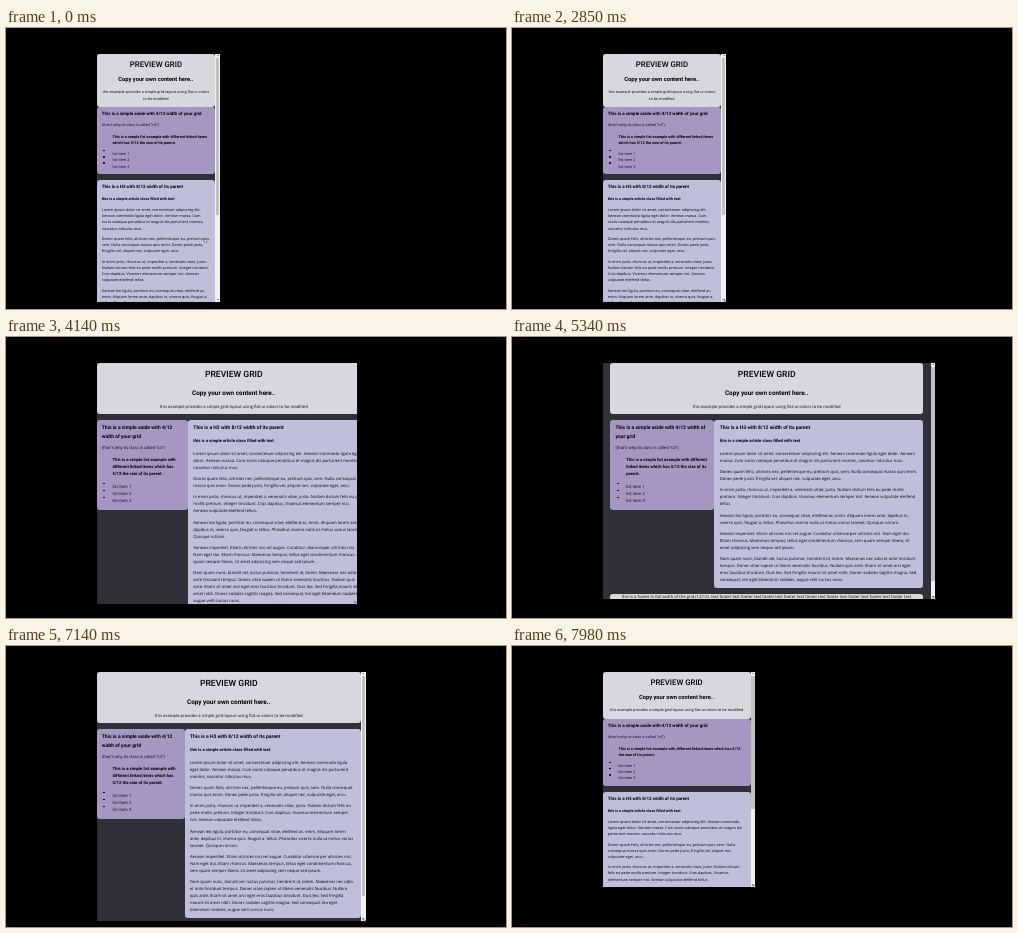
An HTML page that plays this animation: 500 px wide and 281 px high, repeating every 8000 ms.

```html
<!DOCTYPE html>
<html lang="en">
<head>
<meta charset="utf-8">
<title>Preview grid</title>
<style>
* { box-sizing: border-box; margin: 0; padding: 0; }
html, body { width: 100%; height: 100%; overflow: hidden; background: #000; }
#stage { position: relative; width: 500px; height: 281px; overflow: hidden; background: #000; }
#win { position: absolute; left: 90.5px; top: 25.5px; overflow: hidden; background: #303138; }
#page {
  position: absolute; left: 0; top: 0; color: #050508;
  font: 4.16px/7px "Open Sans", sans-serif;
  text-rendering: geometricPrecision;
}
#grid { max-width: 313px; margin: 0 auto; padding-bottom: 6px; background: #303138; }
h1, h2, h3, h4, .lead { font-family: Roboto, sans-serif; font-weight: 700; color: #000; }
header, aside, article, footer, .ghost { border-radius: 3px; }
header, footer, .light { background: #d6d7df; }
aside { background: #a696c2; }
article, .lilac { background: #bebfda; }

header { text-align: center; padding: 7px 4px 3.5px; margin-bottom: 6px; }
h1 { font-size: 8.65px; line-height: 10px; font-weight: 500; }
h2 { font-size: 6.36px; line-height: 8px; margin: 9.5px 0 6.5px; }
main { display: flex; align-items: flex-start; }
aside { width: 33.3333%; padding: 4.25px 5.3px 4.1px; }
article { width: 66.6667%; padding: 4.25px 6px 4.2px 5.3px; }
h3 { font-size: 4.975px; line-height: 8.5px; margin-bottom: 4.2px; }
h4 { font-size: 4.24px; margin: 5.25px 0 6px; }
article p + p { margin-top: 4.2px; }
.lead { font-size: 4.26px; line-height: 6.9px; margin: 6.05px 0 5.8px 10.7px; }
ul { list-style: none; padding-left: 10.7px; line-height: 6.95px; }
li { position: relative; }
li::before {
  content: ""; position: absolute; left: -9px; top: -2.4px;
  width: 1.5px; height: 1.5px; border-radius: 50%; background: #000;
}
footer { text-align: center; padding: .5px 8px 0; margin-top: 6px; line-height: 6.8px; }

.narrow { font-size: 3.75px !important; line-height: 6.24px !important; }
.narrow header { padding: 6.5px 4px 4.1px; margin-bottom: 0; }
.narrow h1 { font-size: 7.8px; line-height: 9px; }
.narrow h2 { font-size: 5.72px; line-height: 7.2px; margin: 7.9px 0 6.3px; }
.narrow main { display: block; }
.narrow aside, .narrow article { width: 100%; }
.narrow aside { padding: 4.2px 5.3px 3.2px; margin-bottom: 6px; }
.narrow article { padding: 4.2px 5.3px 4px; }
.narrow h3 { font-size: 4.476px; line-height: 7.65px; margin-bottom: 4.2px; }
.narrow h4 { font-size: 3.82px; margin: 4.5px 0 5.3px; }
.narrow article p + p { margin-top: 4.05px; }
.narrow .lead { font-size: 3.83px; line-height: 6.4px; margin: 4.7px 0 5.5px 10.7px; }
.narrow ul, .narrow footer { line-height: 6.24px; }

.ghost { position: absolute; left: 150px; }
#bar { position: absolute; top: 0; width: 4.5px; background: #f1f1f1; }
#thumb { position: absolute; left: .5px; top: 4.3px; width: 3.5px; background: #c1c1c1; }
.tip { position: absolute; left: 1.25px; border: 1px solid transparent; }
#up { top: .6px; border-bottom: 1.4px solid #444; }
#down { bottom: .6px; border-top: 1.4px solid #444; }
svg { position: absolute; left: 0; top: 0; }
</style>
</head>
<body>
<div id="stage">
  <div id="win">
    <div class="ghost light"></div>
    <div class="ghost lilac"></div>
    <div class="ghost light"></div>
    <div id="page">
      <div id="grid">
        <header>
          <h1>PREVIEW GRID</h1>
          <h2>Copy your own content here..</h2>
          <p>this example provides a simple grid-layout using flat-ui-colors to be modified</p>
        </header>
        <main>
          <aside>
            <h3>This is a simple aside with 4/12 width of your grid</h3>
            <p>(that's why its class is called "c4")</p>
            <p class="lead">This is a simple list example with different linked items which has 5/12 the size of its parent.</p>
            <ul><li>list item 1</li><li>list item 2</li><li>list item 3</li></ul>
          </aside>
          <article>
            <h3>This is a H3 with 8/12 width of its parent</h3>
            <h4>this is a simple article class filled with text</h4>
            <p>Lorem ipsum dolor sit amet, consectetuer adipiscing elit. Aenean commodo ligula eget dolor. Aenean massa. Cum sociis natoque penatibus et magnis dis parturient montes, nascetur ridiculus mus.</p>
            <p>Donec quam felis, ultricies nec, pellentesque eu, pretium quis, sem. Nulla consequat massa quis enim. Donec pede justo, fringilla vel, aliquet nec, vulputate eget, arcu.</p>
            <p>In enim justo, rhoncus ut, imperdiet a, venenatis vitae, justo. Nullam dictum felis eu pede mollis pretium. Integer tincidunt. Cras dapibus. Vivamus elementum semper nisi. Aenean vulputate eleifend tellus.</p>
            <p>Aenean leo ligula, porttitor eu, consequat vitae, eleifend ac, enim. Aliquam lorem ante, dapibus in, viverra quis, feugiat a, tellus. Phasellus viverra nulla ut metus varius laoreet. Quisque rutrum.</p>
            <p>Aenean imperdiet. Etiam ultricies nisi vel augue. Curabitur ullamcorper ultricies nisi. Nam eget dui. Etiam rhoncus. Maecenas tempus, tellus eget condimentum rhoncus, sem quam semper libero, sit amet adipiscing sem neque sed ipsum.</p>
            <p>Nam quam nunc, blandit vel, luctus pulvinar, hendrerit id, lorem. Maecenas nec odio et ante tincidunt tempus. Donec vitae sapien ut libero venenatis faucibus. Nullam quis ante. Etiam sit amet orci eget eros faucibus tincidunt. Duis leo. Sed fringilla mauris sit amet nibh. Donec sodales sagittis magna. Sed consequat, leo eget bibendum sodales, augue velit cursus nunc,</p>
          </article>
        </main>
        <footer></footer>
      </div>
    </div>
    <div id="bar"><div id="thumb"></div><div class="tip" id="up"></div><div class="tip" id="down"></div></div>
  </div>
  <svg width="500" height="281">
    <path id="hand" d="M-1.2-1.8 L1.8 .6 L.6 .9 L1 2 L.2 2.2 L-.3 1.2 L-1.2 1.8Z" fill="#fff" stroke="#222" stroke-width=".4"/>
    <path id="sizer" d="M-1.4-1.4h1.4l-.5.5 1.4 1.4.5-.5v1.4h-1.4l.5-.5-1.4-1.4-.5.5z" fill="#fff" stroke="#222" stroke-width=".35"/>
  </svg>
</div>
<script>
const LOOP = 8000, LEFT = 90.5, TOP = 25.5, BAR = 4.5, BREAK = 200;
const $ = s => document.querySelector(s);
const win = $('#win'), page = $('#page'), grid = $('#grid'), bar = $('#bar'), thumb = $('#thumb');
const hand = $('#hand'), sizer = $('#sizer');
const ghosts = [...document.querySelectorAll('.ghost')];
const cards = ['header', 'article', 'footer'].map($);
$('footer').textContent = 'this is a footer in full width of the grid (12/12).' + ' text footer'.repeat(10);

// [time, value] pairs, linear in between
const edge = [[3280, 213.8], [4080, 351], [4140, 351], [4860, 423.3], [6480, 423.3],
  [6660, 421.3], [7140, 359.5], [7260, 359.5], [7980, 243.2]];
const flow = [[3280, 213.8], [4140, 369.5], [4860, 423.3], [6480, 423.3],
  [6660, 406.5], [7140, 359.5], [7260, 359.5], [7980, 243.2]];
const base = [[3280, 273.5], [4080, 267.3], [4890, 262], [5340, 262], [5720, 279.5],
  [6660, 279.5], [7140, 275], [7260, 275], [7980, 241]];
const curX = [[10, 199.5], [180, 212.3]];
const curY = [[10, 212.5], [180, 269.5], [420, 269.5], [450, 265.5], [630, 265.5],
  [840, 268.5], [1830, 268.5], [2100, 271], [2280, 271], [2310, 272.5]];

function at(keys, t) {
  let [t0, v0] = keys[0];
  if (t <= t0) return v0;
  for (const [t1, v1] of keys) {
    if (t < t1) return v0 + (v1 - v0) * (t - t0) / (t1 - t0);
    t0 = t1; v0 = v1;
  }
  return v0;
}

const px = (el, prop, v) => { el.style[prop] = v + 'px'; };
const show = (el, on) => { el.style.display = on ? '' : 'none'; };
const move = (el, x, y) => el.setAttribute('transform', `translate(${x} ${y})`);

function render(t) {
  const w = at(edge, t) - LEFT, lw = at(flow, t) - LEFT, h = at(base, t) - TOP;
  px(win, 'width', w);
  px(win, 'height', h);
  page.className = lw < BREAK ? 'narrow' : '';
  px(page, 'width', lw);
  const scrolls = grid.getBoundingClientRect().height > h;
  show(bar, scrolls);
  if (scrolls) {
    px(page, 'width', lw - BAR);
    const full = grid.getBoundingClientRect().height;
    px(bar, 'left', lw - BAR);
    px(bar, 'height', h);
    px(thumb, 'height', (h - 8.6) * Math.min(1, h / full));
  }

  // stale paint left at the right while the window shrinks
  const stale = w - lw > BAR && lw > BREAK;
  ghosts.forEach((g, i) => {
    show(g, stale);
    if (!stale) return;
    const r = cards[i].getBoundingClientRect();
    px(g, 'top', r.top - win.getBoundingClientRect().top);
    px(g, 'height', r.height);
    px(g, 'width', w - 11 - 150);
  });

  const early = t < 180, idle = t < 3280;
  show(hand, early);
  show(sizer, !early);
  move(hand, at(curX, t), at(curY, t));
  move(sizer, idle ? at(curX, t) : LEFT + w - 1.3, idle ? at(curY, t) : TOP + h - 1);
}

const start = performance.now();
function tick() {
  render((performance.now() - start) % LOOP);
  requestAnimationFrame(tick);
}
render(0);
requestAnimationFrame(tick);
</script>
</body>
</html>
```
